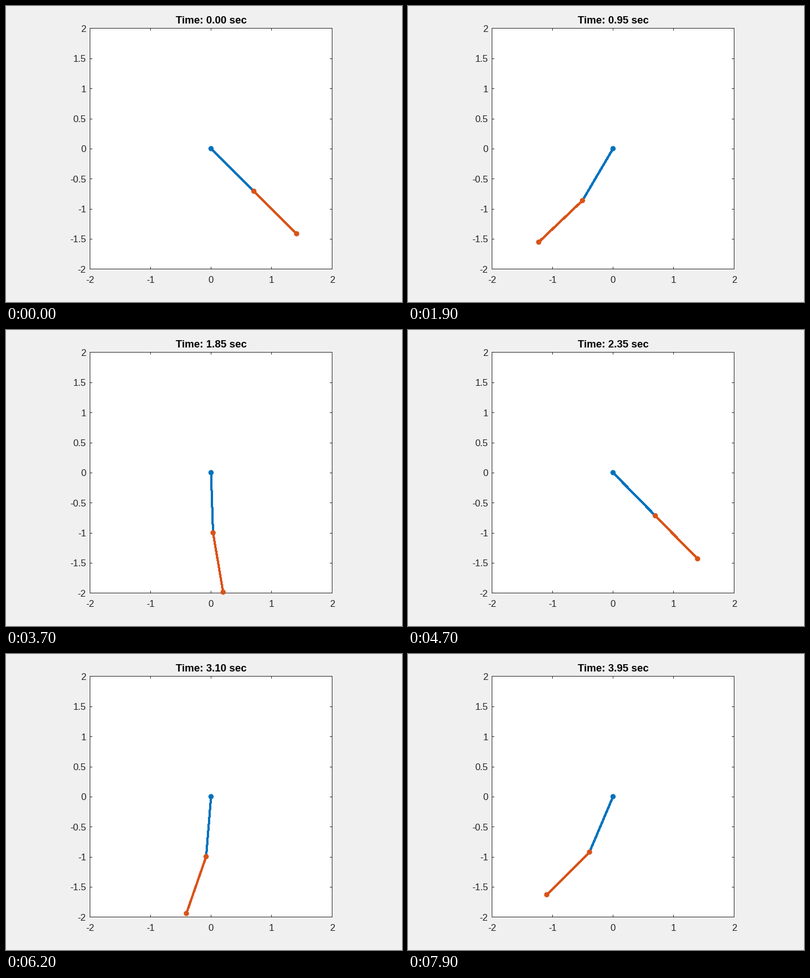
Write a matplotlib script that moves like this. It is 700 by 525 pixels and loops after 8000 ms.

```python
import numpy as np
import matplotlib.pyplot as plt
from matplotlib.animation import FuncAnimation
from matplotlib.patches import Circle

W, H, DPI = 700, 525, 120
FRAMES, DT, SUB = 80, 0.05, 25
G = 9.81
BLUE, ORANGE, INK = "#0072BD", "#D95319", "#262626"
# Just under the half pixel, so that hairlines snap to the intended column or row.
LEFT, RIGHT, TOP, BOTTOM = 148.45, 576.45, 39.45, 466.45


def rates(s):
    """Double pendulum of two uniform rods with unit mass and length."""
    a, b, wa, wb = s
    c, d = np.cos(a - b) / 2, np.sin(a - b) / 2
    ra = -d * wb**2 - 1.5 * G * np.sin(a)
    rb = d * wa**2 - 0.5 * G * np.sin(b)
    det = 4 / 9 - c**2
    return np.array([wa, wb, (ra / 3 - c * rb) / det, (4 / 3 * rb - c * ra) / det])


def rk4(s, h):
    k1 = rates(s)
    k2 = rates(s + h / 2 * k1)
    k3 = rates(s + h / 2 * k2)
    k4 = rates(s + h * k3)
    return s + h / 6 * (k1 + 2 * k2 + 2 * k3 + k4)


def simulate():
    s = np.array([np.pi / 4, np.pi / 4, 0, 0])
    path = []
    for _ in range(FRAMES):
        path.append(s[:2])
        for _ in range(SUB):
            s = rk4(s, DT / SUB)
    return np.array(path)


angles = simulate()

plt.rcParams["font.family"] = "Liberation Sans"
fig = plt.figure(figsize=(W / DPI, H / DPI), dpi=DPI, facecolor="#F0F0F0")
ax = fig.add_axes([LEFT / W, 1 - BOTTOM / H, (RIGHT - LEFT) / W, (BOTTOM - TOP) / H])
ax.set(xlim=(-2, 2), ylim=(-2, 2), facecolor="white")
ax.set_xticks(np.arange(-2, 3))
ax.set_yticks(np.arange(-2, 2.5, 0.5))
ax.tick_params(direction="in", length=2.4, width=0.6, color=INK, top=True, right=True,
               labelbottom=False, labelleft=False)
for spine in ax.spines.values():
    spine.set(linewidth=0.6, edgecolor=INK)


def label(x, y, text, ha="center", **style):
    return fig.text(x / W, 1 - y / H, text, ha=ha, va="baseline", **style)


for v in ax.get_xticks():
    label(LEFT + (v + 2) / 4 * (RIGHT - LEFT), 491, f"{v:g}", size=10, color=INK)
for v in ax.get_yticks():
    label(141.5, BOTTOM - (v + 2) / 4 * (BOTTOM - TOP) + 6.3, f"{v:g}",
          ha="right", size=10, color=INK)
title = label(362.5, 31, "", size=11, weight="bold", color="black")


def rod(color, z):
    return ax.plot([], [], color=color, lw=1.8, antialiased=False,
                   solid_capstyle="butt", clip_on=False, zorder=z)[0]


def dot(color, z):
    # Patches keep sub-pixel centres, unlike line markers.
    return ax.add_patch(Circle((0, 0), 0.0435, color=color, lw=0, clip_on=False, zorder=z))


upper, lower = rod(BLUE, 3), rod(ORANGE, 4)
dots = [dot(BLUE, 3), dot(ORANGE, 5), dot(ORANGE, 5)]


def update(i):
    x = np.concatenate([[0], np.cumsum(np.sin(angles[i]))])
    y = np.concatenate([[0], -np.cumsum(np.cos(angles[i]))])
    upper.set_data(x[:2], y[:2])
    lower.set_data(x[1:], y[1:])
    for d, centre in zip(dots, zip(x, y)):
        d.center = centre
    title.set_text(f"Time: {i * DT:.2f} sec")
    return upper, lower, title, *dots


anim = FuncAnimation(fig, update, frames=FRAMES, interval=100, repeat=True, repeat_delay=0)
plt.show()
```
